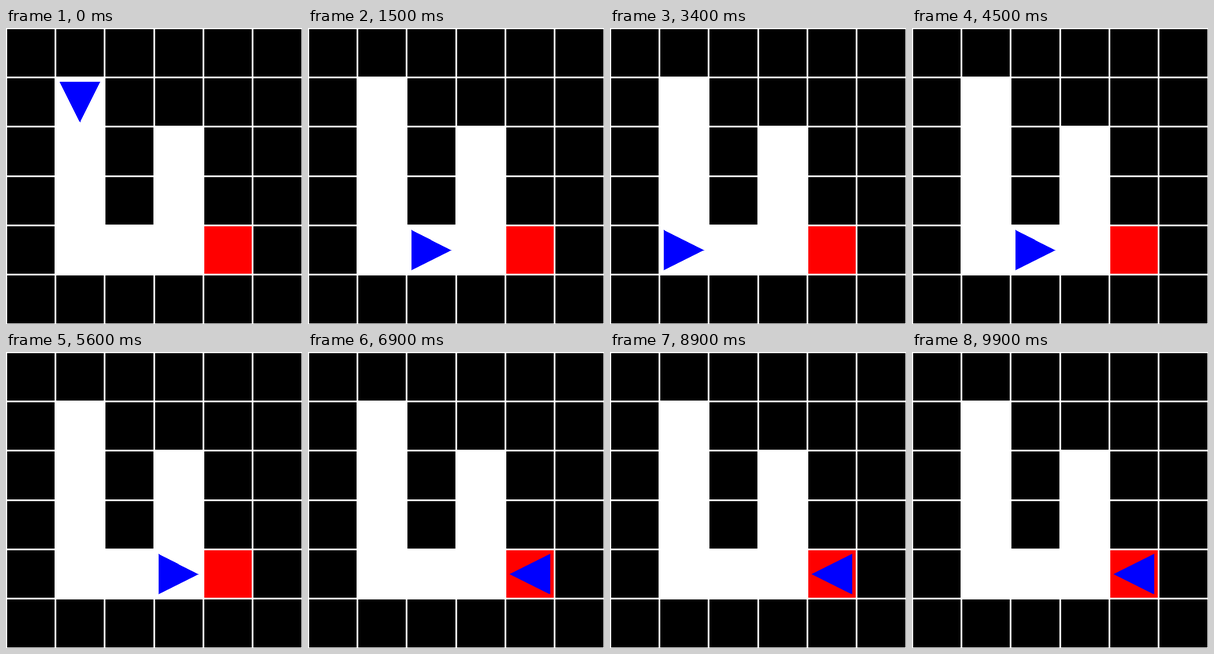
An HTML page with a canvas that plays this animation: 512x512 px, repeating every 10000 ms.

```html
<!DOCTYPE html>
<html lang="en">
<head>
<meta charset="utf-8">
<title>Maze walker</title>
<style>
  html, body { margin: 0; width: 100%; height: 100%; overflow: hidden; background: #fff; }
  canvas { display: block; }
</style>
</head>
<body>
<canvas id="stage" width="512" height="512"></canvas>
<script>
const ctx = document.getElementById('stage').getContext('2d');
const maze = ['######', '#.####', '#.#.##', '#.#.##', '#...G#', '######'];
const STEP = 100, STEPS = 100;
const px = cells => Math.floor(cells * 512 / 6);

// Walk straight ahead; turn left whenever a wall blocks the way.
function walk() {
  const poses = [];
  let x = 1, y = 1, dx = 0, dy = 1;
  for (let i = 0; i < STEPS; i++) {
    poses.push({ x, y, dx, dy });
    if (maze[y + dy][x + dx] === '#') {
      [dx, dy] = [dy, -dx];
    } else {
      x += dx;
      y += dy;
    }
  }
  return poses;
}

function drawMaze() {
  ctx.fillStyle = '#fff';
  ctx.fillRect(0, 0, 512, 512);
  maze.forEach((row, r) => [...row].forEach((cell, c) => {
    if (cell === '.') return;
    ctx.fillStyle = cell === 'G' ? '#f00' : '#000';
    ctx.fillRect(px(c) + 2, px(r) + 2, px(c + 1) - px(c) - 3, px(r + 1) - px(r) - 3);
  }));
}

// Row-by-row fill keeps the edges free of antialiasing.
function fillTriangle(points) {
  const ys = points.map(p => p[1]);
  for (let y = Math.min(...ys); y <= Math.max(...ys); y++) {
    const xs = [];
    points.forEach(([x1, y1], i) => {
      const [x2, y2] = points[(i + 1) % 3];
      if (y < Math.min(y1, y2) || y > Math.max(y1, y2)) return;
      if (y1 === y2) xs.push(x1, x2);
      else xs.push(Math.floor(x1 + (y - y1) * (x2 - x1) / (y2 - y1)));
    });
    const left = Math.min(...xs);
    ctx.fillRect(left, y, Math.max(...xs) - left + 1, 1);
  }
}

function drawWalker({ x, y, dx, dy }) {
  const at = (u, v) => [px(x + 0.5 + 0.4 * u), px(y + 0.5 + 0.4 * v)];
  ctx.fillStyle = '#00f';
  fillTriangle([at(dx, dy), at(dy - dx, dx - dy), at(-dx - dy, -dx - dy)]);
}

const poses = walk();
const start = performance.now();
let shown = -1;

function frame() {
  const step = Math.floor((performance.now() - start) / STEP) % STEPS;
  if (step !== shown) {
    shown = step;
    drawMaze();
    drawWalker(poses[step]);
  }
  requestAnimationFrame(frame);
}
frame();
</script>
</body>
</html>
```
